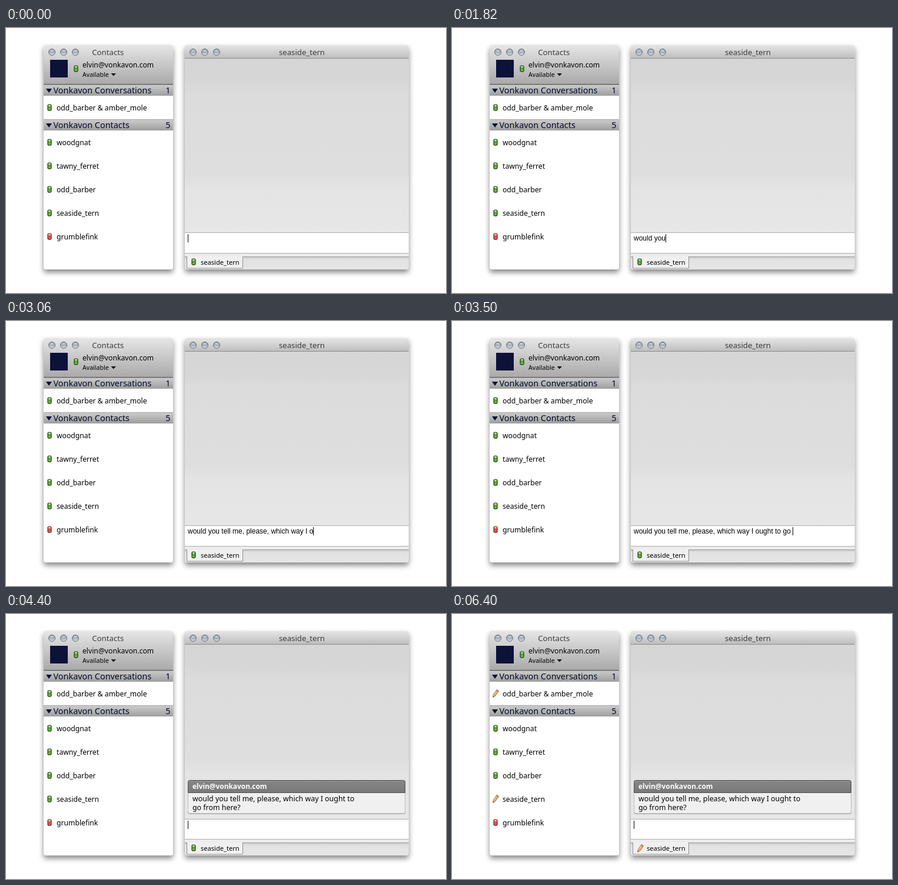
These frames come from a looping animation (748 px wide and 450 px high, 8 s). An HTML page:

```html
<!DOCTYPE html>
<html lang="en">
<head>
<meta charset="utf-8">
<title>Chat</title>
<style>
  html, body { margin: 0; width: 100%; height: 100%; overflow: hidden; background: #fff; }
  svg { display: block; width: 748px; height: 450px; }
  text { font: 12.2px "Noto Sans", "Open Sans", sans-serif; white-space: pre; }
  .title { font-size: 13.2px; fill: #3c3c3c; }
  .small { font-size: 10.6px; }
  .tab { font-size: 11.1px; }
  .section { font-size: 14.4px; fill: #020a26; }
  .sender { font-size: 11.9px; font-weight: 700; fill: #fff; }
  .message { font-size: 12.4px; }
  .input { font: 12px "Liberation Sans", Arial, sans-serif; }
  .window { filter: drop-shadow(0 5px 5px rgba(0, 0, 0, .48)); }
</style>
</head>
<body>
<svg id="stage" viewBox="0 0 748 450" xmlns="http://www.w3.org/2000/svg"></svg>
<script>
const LOOP = 8000, TYPE_START = 1500, KEY_MS = 40;
const SENT = 4400, FRIEND_TYPING = 4900, GROUP_TYPING = 6400;
const MESSAGE = "would you tell me, please, which way I ought to go from here?";
const ME = "elvin@vonkavon.com";
const FRIEND = "seaside_tern";
const CONTACTS = ["woodgnat", "tawny_ferret", "odd_barber", FRIEND, "grumblefink"];
const INPUT_X = 309;

const gradient = (id, ...stops) =>
  `<linearGradient id="${id}" x2="0" y2="1">${stops.map(([at, color]) =>
    `<stop offset="${at}" stop-color="${color}"/>`).join("")}</linearGradient>`;

const rect = (x, y, w, h, fill, extra = "") =>
  `<rect x="${x}" y="${y}" width="${w}" height="${h}" fill="${fill}" ${extra}/>`;

const label = (x, y, str, cls = "", extra = "") =>
  `<text x="${x}" y="${y}" class="${cls}" ${extra}>${str.replace("&", "&amp;")}</text>`;

const use = (ref, x, y, id = "") => `<use href="#${ref}" x="${x}" y="${y}" ${id && `id="${id}"`}/>`;

const pencil = (id, x, y) =>
  `<g id="${id}" transform="translate(${x} ${y})"><use href="#pencil"/></g>`;

const pill = (id, edge, fill, top) =>
  `<g id="${id}">${rect(-3, -4.8, 6, 9.8, `url(#${fill})`, `rx="2" stroke="${edge}" stroke-width="1.3"`)}
   <ellipse cy="-3.2" rx="2.2" ry="1.1" fill="${top}"/></g>`;

const buttons = x => [0, 20, 40].map(dx =>
  `<circle cx="${x + dx}" cy="41" r="5.5" fill="url(#button)" stroke="#6b727c"/>
   <ellipse cx="${x + dx}" cy="38.4" rx="3" ry="1.6" fill="#fff" opacity=".45"/>`).join("");

const section = (y, name, count) =>
  rect(64, y, 220, 19, "url(#section)") + rect(64, y, 220, 1, "#a0a0a0") +
  `<path d="M68 ${y + 7}h10l-5 7z" fill="#08113a"/>` +
  label(80.5, y + 15, name, "section") +
  label(279.5, y + 15, count, "section", 'text-anchor="end"');

const frame = (x, w, fill) => rect(x, 29, w, 381, fill, 'rx="4" class="window"');

const topBar = (x, w, h, fill) =>
  `<path d="M${x} ${29 + h}V33a4 4 0 0 1 4-4h${w - 8}a4 4 0 0 1 4 4v${h - 4}z" fill="url(#${fill})"/>`;

const defs = `<defs>
  ${gradient("header", [0, "#e6e6e6"], [.35, "#d0d0d0"], [1, "#a9a9a9"])}
  ${gradient("titleBar", [0, "#e6e6e6"], [1, "#bebebe"])}
  ${gradient("section", [0, "#cdcdcd"], [1, "#9e9e9e"])}
  ${gradient("button", [0, "#858d99"], [.5, "#a4adb9"], [1, "#dbe1e8"])}
  ${gradient("chat", [0, "#d5d5d5"], [.14, "#d7d7d7"], [.2, "#dcdcdc"], [.66, "#dedede"], [.74, "#e4e4e4"], [1, "#e7e7e7"])}
  ${gradient("tabBar", [0, "#c9c9c9"], [.25, "#e2e2e2"], [1, "#e6e6e6"])}
  ${gradient("bubbleTop", [0, "#979797"], [.12, "#858585"], [1, "#787878"])}
  ${gradient("green", [0, "#72c545"], [.5, "#4fa524"], [1, "#7fd84b"])}
  ${gradient("red", [0, "#f0a04c"], [.5, "#d94a4a"], [1, "#f0606c"])}
  ${pill("online", "#2c4420", "green", "#c9eeb0")}
  ${pill("busy", "#7c2a30", "red", "#ffd49a")}
  <g id="pencil" transform="rotate(35)">
    <path d="M-2 -5h4v8.500l-2 4-2-4z" fill="#f0a94e" stroke="#a8682a" stroke-width=".8"/>
    <path d="M-.7 -4.500v7.500" stroke="#ffdc9c"/>
    <path d="M-2 3.500h4l-2 4z" fill="#f2dfc2" stroke="#8a6a48" stroke-width=".5"/>
    <path d="M-.9 5.600h1.800l-.9 2z" fill="#222"/>
    <path d="M-2.300 -5.200v-1.300q2.300-1.600 4.600 0v1.300z" fill="#d9a09a" stroke="#91645c" stroke-width=".6"/>
  </g>
</defs>`;

const contactsWindow =
  frame(64, 220, "#fff") + topBar(64, 220, 67, "header") + buttons(78) +
  rect(64, 95, 220, 1, "#5c5c5c") +
  label(173.3, 46, "Contacts", "title", 'text-anchor="middle"') +
  rect(75, 54, 30, 30, "#0d1238") +
  use("online", 119, 69) +
  label(130, 67, ME) + label(130, 83, "Available", "small") +
  '<path d="M178.500 77h8.500l-4.250 4.500z" fill="#111"/>' +
  section(96, "Vonkavon Conversations", "1") +
  use("online", 74, 135, "groupOnline") + pencil("groupPencil", 74, 135) +
  label(86, 140, "odd_barber & amber_mole") +
  section(155, "Vonkavon Contacts", "5") +
  CONTACTS.map((name, i) => {
    const y = 194 + i * 40;
    const isFriend = name === FRIEND;
    return use(i === CONTACTS.length - 1 ? "busy" : "online", 74, y, isFriend ? "friendOnline" : "") +
      (isFriend ? pencil("friendPencil", 74, y) : "") +
      label(86, y + 5, name);
  }).join("");

const bubble = `<g id="bubble">
  ${rect(309, 283, 370, 57, "#000", 'rx="3" opacity=".22"')}
  ${rect(309.5, 282.5, 369, 56, "#f0f0f0", 'rx="3" stroke="#bdbdbd"')}
  <path d="M309.500 303.500v-18a3 3 0 0 1 3-3h363a3 3 0 0 1 3 3v18z" fill="url(#bubbleTop)" stroke="#505050"/>
  ${label(317, 297, ME, "sender")}
  ${label(317, 318, MESSAGE.slice(0, 47), "message")}
  ${label(317, 332.5, MESSAGE.slice(48), "message")}
</g>`;

const inputBox = `<g id="input">
  ${rect(304, 347, 380.5, 1, "#adadad")}
  ${rect(304, 348, 380.5, 34, "#fff")}
  ${label(INPUT_X, 361, "", "input", 'id="typed"')}
  ${rect(INPUT_X, 350, 1, 14, "#000", 'id="caret"')}
</g>`;

const chatWindow =
  frame(304, 380.5, "#e8e8e8") + topBar(304, 380.5, 22, "titleBar") +
  rect(304, 51, 380.5, 1, "#8c8c8c") + buttons(318) +
  label(503, 46, FRIEND, "title", 'text-anchor="middle"') +
  rect(304, 52, 380.5, 296, "url(#chat)") + bubble + inputBox +
  rect(304, 382, 380.5, 1, "#adadad") + rect(304, 383, 380.5, 5, "#ececec") +
  '<path d="M304 388h380.500v18a4 4 0 0 1-4 4h-372.500a4 4 0 0 1-4-4z" fill="url(#tabBar)"/>' +
  rect(304, 388, 380.5, 1, "#979797") +
  rect(307, 388, 96, 20, "#f0f0f0") +
  '<path d="M307.500 388v20h95v-20" fill="none" stroke="#8e8e8e"/>' +
  use("online", 319, 397, "tabOnline") + pencil("tabPencil", 320, 398) +
  label(331, 402, FRIEND, "tab");

const byId = id => document.getElementById(id);
byId("stage").innerHTML = defs + contactsWindow + chatWindow;

const show = (id, on) => byId(id).setAttribute("visibility", on ? "visible" : "hidden");
const setTyping = (who, on) => {
  show(who + "Online", !on);
  show(who + "Pencil", on);
};

function render(t) {
  const sent = t >= SENT;
  const keys = Math.floor((t - TYPE_START) / KEY_MS) + 1;
  const count = sent ? 0 : Math.max(0, Math.min(MESSAGE.length, keys));
  const typed = byId("typed");
  typed.textContent = MESSAGE.slice(0, count);
  const width = count ? typed.getComputedTextLength() : 0;
  byId("caret").setAttribute("x", INPUT_X + Math.round(width));
  // The input settles one pixel lower once the message is sent.
  byId("input").setAttribute("transform", `translate(0 ${sent ? 1 : 0})`);
  show("bubble", sent);
  setTyping("friend", t >= FRIEND_TYPING);
  setTyping("tab", t >= FRIEND_TYPING);
  setTyping("group", t >= GROUP_TYPING);
}

const start = performance.now();
function tick() {
  render((performance.now() - start) % LOOP);
  requestAnimationFrame(tick);
}
tick();
</script>
</body>
</html>
```
